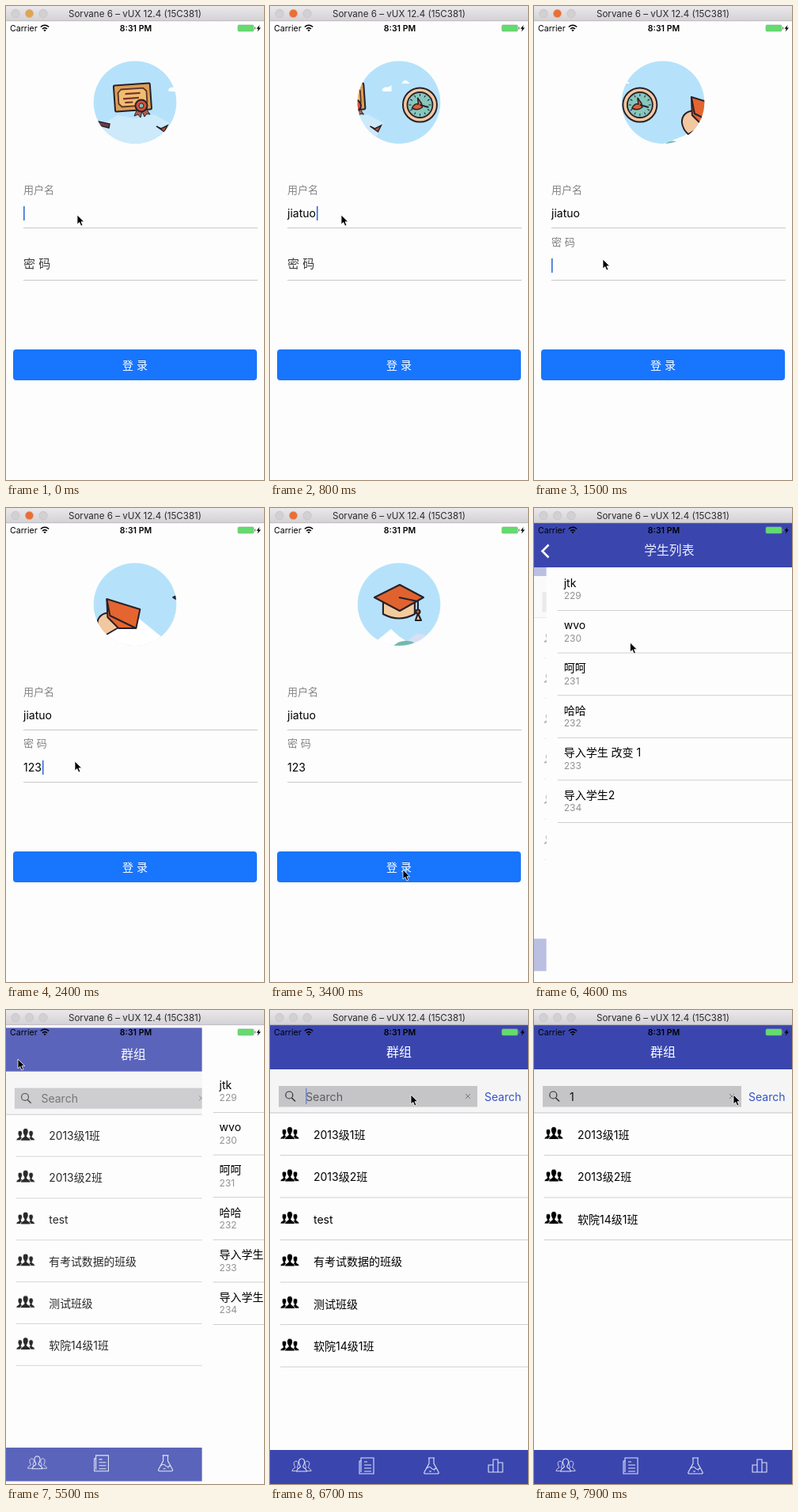
Recreate the animation shown at these times as an HTML page. Size 326 px wide and 599 px high, loop 8 s.

```html
<!DOCTYPE html>
<html lang="zh-CN">
<head>
<meta charset="utf-8">
<title>Login and groups</title>
<style>
html, body { margin: 0; width: 100%; height: 100%; overflow: hidden; background: #fdfdfd; }
svg { display: block; width: 100%; height: 100%; }
text { font-family: Inter, "Noto Sans CJK SC", "Noto Sans CJK", sans-serif; white-space: pre; }
</style>
</head>
<body>
<svg id="stage" viewBox="0 0 326 599" xmlns="http://www.w3.org/2000/svg"></svg>
<script>
const LOOP = 8000, STEP = 100, WIDTH = 326;
const BLUE = '#3a46ae', DARK = '#29212b', PAPER = '#fdfdfd';
const GROUPS = ['2013级1班', '2013级2班', 'test', '有考试数据的班级', '测试班级', '软院14级1班'];
const STUDENTS = ['jtk', 'wvo', '呵呵', '哈哈', '导入学生 改变 1', '导入学生2'];
const USER = 'jiatuo', PASSWORD = '123';

// Markup helpers; label() takes the vertical centre of its text.
const label = (x, cy, size, content, attrs = '') =>
  `<text x="${x}" y="${cy + size * 0.36}" font-size="${size}" ${attrs}>${content}</text>`;
const rect = (x, y, w, h, fill, attrs = '') =>
  `<rect x="${x}" y="${y}" width="${w}" height="${h}" fill="${fill}" ${attrs}/>`;
const rule = (x, y, end = WIDTH, color = '#cfcfd1') =>
  `<path d="M${x} ${y}H${end}" stroke="${color}"/>`;
const path = (d, attrs = '') => `<path d="${d}" ${attrs}/>`;
const at = (x, y, content, attrs = '') => `<g transform="translate(${x} ${y})" ${attrs}>${content}</g>`;
const centered = 'text-anchor="middle"';

const personPath = 'M0-8.5C2.6-8.5 3.8-6.5 3.5-3.5 3.3-1.2 1.8 0 1.6 1.6 2 3.6 6 3.2 6.5 7.5H-6.5C-6 3.2-2 3.6-1.6 1.6-1.8 0-3.3-1.2-3.5-3.5-3.8-6.5-2.6-8.5 0-8.5Z';
const people = attrs =>
  path(personPath, `transform="translate(-7 1.2) scale(.78)" ${attrs}`) +
  path(personPath, `transform="translate(7 1.2) scale(.78)" ${attrs}`) +
  path(personPath, attrs);

function certificate() {
  const ink = `stroke="${DARK}" stroke-width="2"`;
  return path('M-42 32L-22 20 0 24 24 19 44 30 30 56H-30Z', 'fill="#cdeafa"') +
    `<g transform="translate(-3 -1.5) rotate(-4)">
    ${rect(-23, -17.5, 46, 33, '#dd9d55', ink + ' rx="1.5"')}
    ${path('M-14-12H14L18-8V6L14 10H-14L-18 6V-8Z', 'fill="#efbd72" stroke="#5c3527" stroke-width="1.8"')}
    ${path('M-9-6H10M-12 0H8M-10 5H0', 'stroke="#7c3328" stroke-width="2.2"')}</g>
    ${path('M3 12L-1 21 4 19 7 23 9 15 12 22 15 18 19 19 13 10Z', `fill="#a95f4d" stroke="${DARK}"`)}
    <circle cx="8" cy="8" r="7.5" fill="#cf5137" ${ink}/><circle cx="8" cy="8" r="3" fill="#8db5b4" stroke="${DARK}"/>
    ${path('M-46 28L-32 31-33 36-45 33Z', `fill="#6d3d4a" stroke="${DARK}" stroke-width="1.5"`)}
    ${path('M27 34L33 37 41 33 37 41Z', `fill="#b8523f" stroke="${DARK}" stroke-width="1.5"`)}
    ${path('M42-12C45-18 49-13 54-18V-10H43Z', 'fill="#fff"')}`;
}

function clock() {
  let ticks = '';
  for (let a = 0; a < 360; a += 30) ticks += path('M0-14V-11', `transform="rotate(${a})" stroke="${DARK}"`);
  return at(0, 7, `<circle r="21.5" fill="#f3c79f" stroke="${DARK}" stroke-width="2"/>
    <circle r="16" fill="#86c7bd" stroke="${DARK}" stroke-width="1.8"/>${ticks}
    ${path('M-10 4Q-7-2-2-1L-3-9 2-2 3 3Q-3 8-10 4Z', `fill="#df6136" stroke="${DARK}" stroke-width="1.5"`)}
    ${path('M0 0L11 3', `stroke="${DARK}" stroke-width="2"`)}`) +
    path('M-23-20q4-8 10 0z', 'fill="#fff"');
}

function book() {
  const ink = `stroke="${DARK}" stroke-width="2" stroke-linejoin="round"`;
  return path('M-60 56L-34 46-10 30 16 22 58 56Z', 'fill="#fff"') +
    path('M-58 56Q-52 51-44 53V56Z', 'fill="#72b9ae"') +
    path('M-22 14Q-37 16-37 29-36 38-29 44L-5 30Z', `fill="#f3c79f" ${ink}`) +
    path('M-25-3L17 10 12 34-10 34-24 20Z', `fill="#e4652f" ${ink}`) +
    path('M-25-3L-21 18 12 34', `fill="none" ${ink}`);
}

function cap() {
  const ink = `stroke="${DARK}" stroke-width="2.2" stroke-linejoin="round"`;
  return path('M-36 56L-10 35 0 44 18 56Z', 'fill="#fff"') +
    path('M4 56L22 41 32 42 52 56Z', 'fill="#d7e0f5"') +
    path('M-7 56Q6 45 22 53V56Z', 'fill="#72b9ae"') +
    path('M-20 2V16Q0 27 20 16V2Z', `fill="#f3cc9d" ${ink}`) +
    path('M-31-5L1-21 31-5 1 12Z', `fill="#e0632f" ${ink}`) +
    path('M0-5L24 0V12', `fill="none" ${ink}`) +
    path('M24 15L21 24H28Z', `fill="#f3cc9d" ${ink}`) + `<circle cx="24" cy="13" r="2.5" fill="#e0632f" ${ink}/>`;
}

const SPACING = 90, SCROLL_MS = 1133;
const pictures = [certificate, clock, book, cap].map((draw, i) => at(i * SPACING, 0, draw())).join('');

const login = `<g id="login">${rect(0, 19, WIDTH, 580, PAPER)}
  <g clip-path="url(#avatar)">${rect(110, 69, 106, 106, '#b5e2fa')}<g id="scroll">${pictures}</g></g>
  ${label(22, 232, 13, '用户名', 'fill="#858585"')}
  ${label(22, 262, 14, '', 'id="user"')}${rule(22, 280.5, 318, '#c9c9c9')}
  <text id="passLabel" x="22">密 码</text>
  ${label(22, 328, 14, '', 'id="pass"')}${rule(22, 346.5, 318, '#c9c9c9')}
  ${rect(22, 0, 1.6, 18, '#2f6fd8', 'id="caret"')}
  ${rect(9, 434, 308, 39, '#1875fd', 'rx="4"')}
  ${label(163, 454, 14, '登 录', centered + ' fill="#fff"')}</g>`;

const groupRows = GROUPS.map((name, i) => `<g class="row">
  ${at(25, 156, people(`stroke="${PAPER}" stroke-width=".9"`))}${label(55, 157.5, 14, name)}${rule(13, 183.5)}</g>`).join('');

const tabIcons =
  at(40, 575.5, people(`fill="${BLUE}"`)) +
  at(122, 576, path('M-7-10H9V10H-9V-6H-7ZM-7-6V8M-3-5H1M-3-1H6M-3 3H6M-3 7H6')) +
  at(204, 576, path('M-4-10H4M-3-10V-3L-9 8Q-10 10-7 10H7Q10 10 9 8L3-3V-10M-6 3Q-2 0 0 3T6 3M-3 7H0M3 6H4')) +
  at(285, 576, path('M-9 8V-1H-3V8ZM-3 8V-8H3V8ZM3 8V-4H9V8Z'));

const groups = `<g id="groups">${rect(0, 19, WIDTH, 580, PAPER)}
  ${rect(0, 19, WIDTH, 56, BLUE)}${label(163, 53.5, 16, '群组', centered + ' fill="#fff"')}
  ${rect(0, 75, WIDTH, 55, '#f5f5f6')}${rule(0, 130, WIDTH, '#c6c6c8')}
  ${rect(11, 96, 251, 26.5, '#c5c5c8')}
  <g fill="none" stroke="#333"><circle cx="24.3" cy="107.5" r="4.5" stroke-width="1.2"/>
  ${path('M27.5 111L32 115.5', 'stroke-width="1.5"')}${path('M247 106L253 112M253 106L247 112', 'stroke="#77777b"')}</g>
  ${label(45, 109.5, 14.2, 'Search', 'id="query"')}
  ${rect(45, 99, 1.5, 20, '#7589cf', 'id="searchCaret"')}
  ${label(271, 109.5, 14, 'Search', 'fill="#3453c4"')}
  ${groupRows}
  ${rect(0, 556, WIDTH, 43, BLUE)}
  <g fill="none" stroke="#dfe2f6" stroke-width="1.1">${tabIcons}</g></g>`;

const students = `<g id="students">${rect(0, 19, WIDTH, 580, PAPER)}
  ${STUDENTS.map((name, i) => at(0, i * 53.6,
    label(22, 94.7, 14, name) + label(22, 111, 12, 229 + i, 'fill="#929292"') + rule(14, 129.5))).join('')}</g>`;

const studentBar = `<g id="studentBar">${rect(0, 19, WIDTH, 56, BLUE)}
  ${path('M18.5 46.5L10.5 54.5 18.5 62.5', 'fill="none" stroke="#fff" stroke-width="2.6"')}
  ${label(163, 53.5, 15.8, '学生列表', `id="studentTitle" ${centered} fill="#eceefa"`)}</g>`;

const chrome = `${rect(0, 0, WIDTH, 19, 'url(#bar)')}${rule(0, 18.7, WIDTH, '#bdbabd')}
  ${[12, 29.5, 47].map((x, i) => `<circle cx="${x}" cy="9.5" r="5.2" fill="#d3d0d3" stroke="#c3c0c3" stroke-width=".7" ${i === 1 ? 'id="light"' : ''}/>`).join('')}
  ${label(163, 9.8, 11.6, 'Sorvane 6 – vUX 12.4 (15C381)', centered + ' fill="#2b292b"')}
  ${label(5, 28, 10.6, 'Carrier')}
  ${label(164, 28, 10.5, '8:31 PM', centered + ' font-weight="600"')}
  <g fill="none" stroke="#000" stroke-width="1.5">${path('M43.8 26.5Q49 22 54.2 26.5M46 29Q49 26.3 52 29')}</g>
  ${path('M47.3 30.5Q49 29 50.7 30.5L49 32.3Z')}
  ${rect(293, 24, 20, 8, '#62dc6c', 'rx="1.5" stroke="#8aa88c" stroke-width=".6"')}${rect(314, 26.5, 1.2, 3, '#777')}
  ${path('M320.5 24L316.5 28.8H318.8L317.7 32.5 322 27.5H319.5Z')}`;

const stage = document.getElementById('stage');
stage.innerHTML = `<defs>
  <clipPath id="avatar"><circle cx="163" cy="121.7" r="52.3"/></clipPath>
  <linearGradient id="bar" x2="0" y2="1"><stop stop-color="#ebe8eb"/><stop offset="1" stop-color="#d4d1d4"/></linearGradient></defs>
  ${rect(0, 0, WIDTH, 599, PAPER)}${login}${groups}${students}${studentBar}${chrome}
  <path id="pointer" d="M0 0V12L2.8 9.4 4.8 14 6.9 13.1 5 8.7H8.7Z" stroke="#fff" stroke-width=".8"/>`;

const ui = {};
stage.querySelectorAll('[id]').forEach(el => ui[el.id] = el);
const rows = [...stage.querySelectorAll('.row')];

const POINTER = [
  [0, 90, 264], [900, 90, 264], [1250, 87, 320], [2500, 87, 320], [3200, 168, 457],
  [3650, 168, 457], [4150, 121.5, 170], [4700, 121.5, 170], [5200, 15, 62], [5700, 15, 62],
  [6400, 178, 107], [7300, 178, 107], [7800, 252, 107], [8000, 252, 107]
];

const clamp = v => Math.min(1, Math.max(0, v));
const easeOut = (t, start, duration) => 1 - (1 - clamp((t - start) / duration)) ** 3;
const typed = (text, t, start, interval) =>
  text.slice(0, Math.max(0, Math.floor((t - start) / interval) + 1));
const show = (el, on) => el.setAttribute('visibility', on ? 'visible' : 'hidden');

// The page behind shrinks towards its left edge and fades.
function recede(el, visible) {
  const scale = 0.95 + 0.05 * visible;
  el.setAttribute('transform', `translate(0 ${309 * (1 - scale)}) scale(${scale})`);
  el.setAttribute('opacity', 0.3 + 0.7 * visible);
}
const slide = (el, x) => el.setAttribute('transform', `translate(${x} 0)`);

function pointerAt(t) {
  const i = POINTER.findIndex(key => key[0] > t);
  const [t0, x0, y0] = POINTER[i - 1], [t1, x1, y1] = POINTER[i];
  const u = (t - t0) / (t1 - t0), k = u * u * (3 - 2 * u);
  return [x0 + (x1 - x0) * k, y0 + (y1 - y0) * k];
}

function drawLogin(t) {
  ui.scroll.setAttribute('transform', `translate(${163 - t / SCROLL_MS * SPACING} 118)`);
  ui.user.textContent = typed(USER, t, 300, 100);
  ui.pass.textContent = typed(PASSWORD, t, 1800, 200);

  const float = easeOut(t, 1300, 300), size = 15 - 2 * float, grey = Math.round(60 + 73 * float);
  ui.passLabel.setAttribute('font-size', size);
  ui.passLabel.setAttribute('y', 326 - 29 * float + size * 0.36);
  ui.passLabel.setAttribute('fill', `rgb(${grey},${grey},${grey})`);

  const onPass = t >= 1300, field = onPass ? ui.pass : ui.user;
  ui.caret.setAttribute('x', 22 + (field.textContent ? field.getComputedTextLength() + 1 : 0));
  ui.caret.setAttribute('y', onPass ? 319 : 253);
  show(ui.caret, t < 3200 && (t < 2300 || t % 1000 < 500));
}

function drawSearch(t) {
  const filtered = t >= 7100;
  ui.query.textContent = filtered ? '1' : 'Search';
  ui.query.setAttribute('fill', filtered ? '#111' : '#5c5c61');
  ui.searchCaret.setAttribute('x', filtered ? 53 : 45);
  show(ui.searchCaret, t >= 6500 && t < 7600);
  let place = 0;
  rows.forEach((row, i) => {
    const match = !filtered || GROUPS[i].includes('1');
    row.setAttribute('display', match ? 'inline' : 'none');
    if (match) row.setAttribute('transform', `translate(0 ${53.5 * place++})`);
  });
}

function drawPages(t) {
  const entered = easeOut(t, 3500, 550);
  recede(ui.login, 1 - entered);
  show(ui.login, entered < 1);
  const visible = t < 5292 ? 1 - easeOut(t, 4250, 550) : easeOut(t, 5292, 550);
  if (t < 4250) slide(ui.groups, WIDTH * (1 - entered));
  else recede(ui.groups, visible);
  slide(ui.students, WIDTH * visible);
  show(ui.studentBar, t > 4250 && t < 5292);
  ui.studentTitle.setAttribute('x', 163 + WIDTH * visible / 2);
}

function draw(t) {
  drawLogin(t);
  drawSearch(t);
  drawPages(t);
  ui.light.setAttribute('fill', t < 800 ? '#dfa550' : t < 3700 ? '#ea6f35' : '#d3d0d3');
  ui.pointer.setAttribute('transform', `translate(${pointerAt(t).join(' ')})`);
}

const start = performance.now();
function tick() {
  const t = (performance.now() - start) % LOOP;
  draw(Math.floor(t / STEP) * STEP);
  requestAnimationFrame(tick);
}
tick();
</script>
</body>
</html>
```
